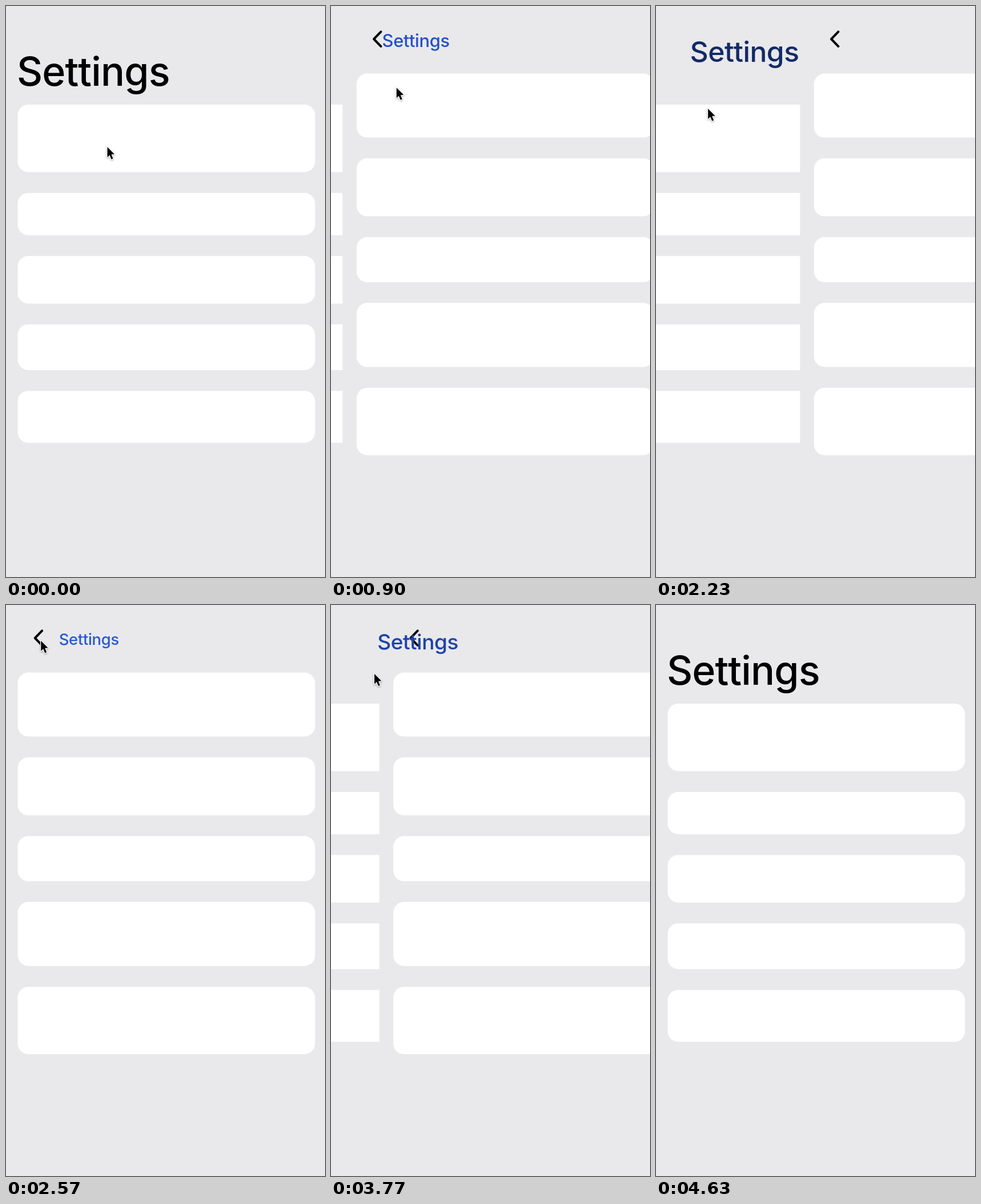
Animation, 559 px wide and 1002 px high, one loop 5360 ms. Source, as an HTML page:

```html
<!DOCTYPE html>
<html lang="en">
<head>
<meta charset="utf-8">
<title>Settings</title>
<style>
  html, body { margin: 0; width: 100%; height: 100%; overflow: hidden; background: #e9e9eb; }
  svg { display: block; width: 559px; height: 1002px; }
  .card { fill: #fff; }
  #title { font-family: Inter, "Open Sans", sans-serif; font-weight: 500; letter-spacing: -.012em; }
  #chevron { fill: none; stroke: #000; stroke-width: 4; stroke-linecap: round; stroke-linejoin: round; }
  #cursor { filter: drop-shadow(0 1.5px 1.5px rgba(0, 0, 0, .35)); }
  #arrow { stroke: #fff; stroke-width: 2.6; stroke-linejoin: round; paint-order: stroke; }
  #beam use { fill: none; stroke: #000; stroke-width: 1.6; }
  #beam use:first-child { stroke: #fff; stroke-width: 3.4; }
</style>
</head>
<body>
<svg viewBox="0 0 559 1002">
  <defs>
    <path id="bar" d="M-4.5 -11.5Q0 -11.5 0 -8V8Q0 11.5 -4.5 11.5M4.5 -11.5Q0 -11.5 0 -8V8Q0 11.5 4.5 11.5M-2.5 3H2.5"/>
  </defs>
  <g id="home"></g>
  <g id="detail">
    <rect x="-4" y="-100" width="800" height="1300" fill="#e9e9eb"/>
    <path id="chevron" d="M63.2 45.2L50.8 58L63.2 70.8"/>
  </g>
  <text id="title">Settings</text>
  <g id="cursor">
    <path id="arrow" d="M.6 .6V18.5L4.6 14.8L7.6 22L10.6 20.7L7.6 13.6L13 13Z"/>
    <g id="beam"><use href="#bar"/><use href="#bar"/></g>
  </g>
</svg>
<script>
  const LOOP = 5360, SLIDE = 350, GAP = 36.5;
  const BIG = 70, SMALL = 27.5, LINE = 1.23;
  const $ = id => document.getElementById(id);
  const home = $('home'), detail = $('detail'), title = $('title');
  const cursor = $('cursor'), arrow = $('arrow'), beam = $('beam');

  // start times of the slides: open, back, open, back ...
  const slides = [643, 1471, 2110, 2790, 3579, 4262];

  // the pointer glides between a card and the back button
  const rest = [177, 247], back = [57, 48], card = [95, 197], away = [-24, 110];
  const glides = [
    { at: 370, time: 1030, to: back },
    { at: 1470, time: 570, to: card },
    { at: 2110, time: 570, to: back },
    { at: 2790, time: 550, to: card },
    { at: 3480, time: 570, to: back },
    { at: 4270, time: 350, to: away }
  ];

  const mix = (a, b, k) => a + (b - a) * k;
  const clamp = k => Math.min(1, Math.max(0, k));
  const smooth = k => k * k * (3 - 2 * k);
  const move = (el, x, y) => el.setAttribute('transform', `translate(${x.toFixed(2)} ${y.toFixed(2)})`);

  function stack(page, y, heights) {
    for (const height of heights) {
      const rect = document.createElementNS('http://www.w3.org/2000/svg', 'rect');
      const attrs = { class: 'card', x: 20.5, y, width: 521, height, rx: 18.5 };
      for (const key in attrs) rect.setAttribute(key, attrs[key]);
      page.append(rect);
      y += height + GAP;
    }
  }

  // cubic-bezier(.35, .05, .2, 1)
  function ease(x) {
    const curve = (a, b, s) => 3 * a * s * (1 - s) ** 2 + 3 * b * s * s * (1 - s) + s ** 3;
    if (x <= 0 || x >= 1) return clamp(x);
    let lo = 0, hi = 1;
    for (let i = 0; i < 24; i++) {
      const mid = (lo + hi) / 2;
      if (curve(.35, .2, mid) < x) lo = mid; else hi = mid;
    }
    return curve(.05, 1, lo);
  }

  function cursorAt(t) {
    let spot = rest;
    for (const { at, time, to } of glides) {
      const k = smooth(clamp((t - at) / time));
      spot = spot.map((v, i) => mix(v, to[i], k));
    }
    return spot;
  }

  function draw(t) {
    const n = slides.filter(s => s <= t).length;
    const opening = n % 2 === 1;
    const left = n ? 1 - ease((t - slides[n - 1]) / SLIDE) : 0;
    const toward = k => opening ? 1 - k : k;

    // the heading's size and colour trail behind its position
    const small = toward(left ** .8);
    const size = mix(BIG, SMALL, small);
    const x = mix(18.9, 92.7, toward(left));
    const base = mix(121.2, 62.2, toward(left ** (opening ? 1.22 : .86))) + .27 * size;
    title.setAttribute('x', x.toFixed(2));
    title.setAttribute('y', base.toFixed(2));
    title.style.fontSize = size.toFixed(2) + 'px';
    title.style.fill = `rgb(${[40, 88, 216].map(c => Math.round(c * small))})`;

    // lists follow the heading's line height
    move(home, -280 * toward(left), opening ? 0 : LINE * (size - BIG));
    move(detail, 571 * (1 - toward(left)), opening ? Math.max(0, LINE * (size - 56.5)) : 0);
    detail.style.opacity = opening ? 1 : left;

    const [cx, cy] = cursorAt(t);
    const onText = cx > x && cx < x + 3.8 * size && cy > base - size && cy < base + .25 * size;
    move(cursor, cx, cy);
    arrow.style.display = onText ? 'none' : '';
    beam.style.display = onText ? '' : 'none';
  }

  stack(home, 173, [118.5, 74.2, 83.5, 80.2, 91]);
  stack(detail, 118.5, [112.3, 101.8, 79, 112.4, 118.2]);

  const start = performance.now();
  function tick() {
    draw((performance.now() - start) % LOOP);
    requestAnimationFrame(tick);
  }
  tick();
</script>
</body>
</html>
```
